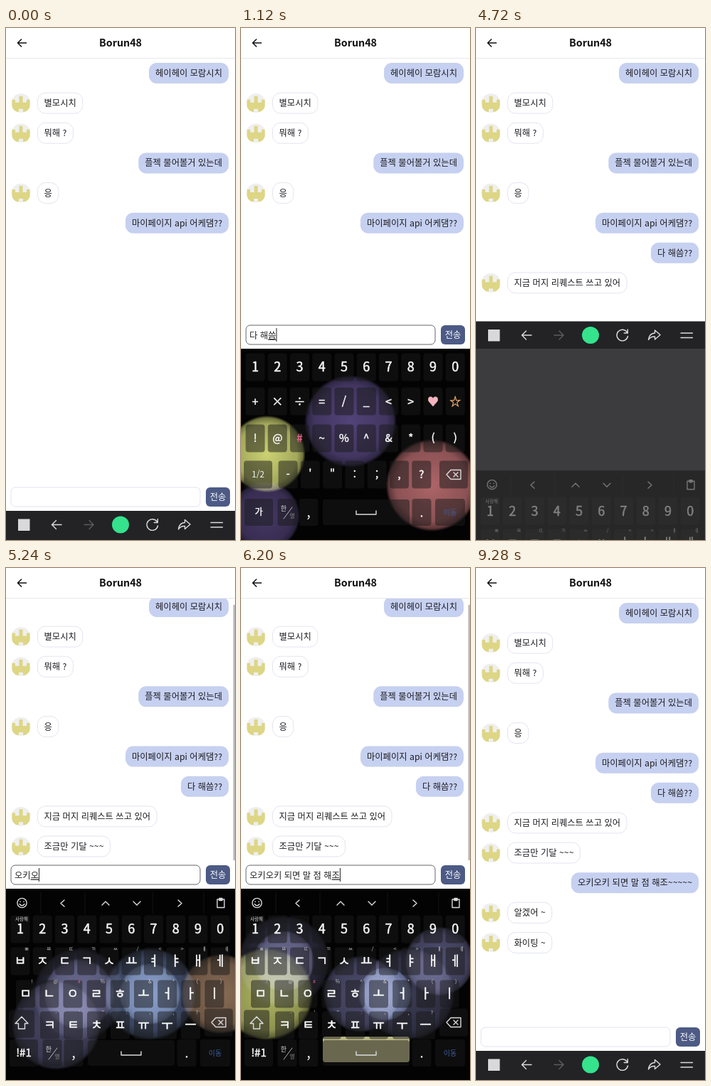
An HTML page that plays this animation: 322x720 px, repeating every 9.32 s.

```html
<!DOCTYPE html>
<html lang="ko">
<head>
<meta charset="utf-8">
<title>Chat</title>
<style>
  html, body { margin: 0; width: 100%; height: 100%; overflow: hidden; background: #fff; }
  svg { display: block; width: 100vw; height: 100vh; }
  text { font-family: "Noto Sans CJK KR", "Noto Sans CJK", "Noto Sans", sans-serif; white-space: pre; }
  .icon { fill: none; stroke: #dcdcde; stroke-width: 1.4; stroke-linecap: round; stroke-linejoin: round; }
  .key { fill: rgba(26, 26, 26, .5); }
  .glyph { paint-order: stroke; stroke: currentColor; stroke-width: .5; stroke-linejoin: round; font-weight: 500; }
  #glows { isolation: isolate; }
  #glows > * { mix-blend-mode: screen; }
</style>
</head>
<body>
<svg viewBox="0 0 322 720">
  <defs>
    <clipPath id="round"><circle cx="21" cy="0" r="13.6"/></clipPath>
    <clipPath id="board"><rect y="451" width="322" height="269"/></clipPath>
  </defs>
  <rect width="322" height="720" fill="#fff"/>
  <g id="chat"></g>
  <rect id="thumb" x="319.5" width="2.5" fill="#b9b9bb"/>
  <rect width="322" height="42" fill="#fff"/>
  <path d="M0 42.5H322" stroke="#e9e9ec"/>
  <path d="M29 21H16.5M22 15.500L16.500 21L22 26.500" fill="none" stroke="#111" stroke-width="1.5"/>
  <g id="composer">
    <rect y="639" width="322" height="40" fill="#fff"/>
    <rect id="field" x="7" y="646" width="266" height="27" rx="6" fill="#fff"/>
    <text id="entry" x="12" y="664.5" font-size="12.300" fill="#222"><tspan id="done"></tspan><tspan id="composing" text-decoration="underline"></tspan></text>
    <rect id="caret" y="650" width="1" height="19" fill="#222"/>
    <rect x="281" y="646" width="34" height="27" rx="6" fill="#4c5a85"/>
  </g>
  <g id="nav">
    <rect y="679" width="322" height="41" fill="#232326"/>
    <rect x="17" y="690.500" width="16.500" height="16.500" fill="#d9d9dc"/>
    <g class="icon">
      <path d="M78 698.500H64.500M70.500 692.500L64.500 698.500L70.500 704.500"/>
      <path d="M110 698.500H123M117 692.500L123 698.500L117 704.500" stroke="#5c5c60"/>
      <path d="M212.500 694.500A7.800 7.800 0 1 0 213.500 700M213.300 690.500V695.500H208.300"/>
      <path d="M251.500 691.500L259 698L251.500 704.500V700.500Q245.500 700 242.500 705Q243.500 696 251.500 695.500Z"/>
      <path d="M288 695.500H304.500M288 702H304.500"/>
    </g>
    <circle cx="161" cy="698.500" r="12" fill="#34e38c"/>
  </g>
  <rect id="backdrop" y="451" width="322" height="269" fill="#3c3c3e"/>
  <g id="keyboard">
    <rect y="451" width="322" height="269" fill="#030303"/>
    <g id="glows" clip-path="url(#board)"></g>
    <g id="letters">
      <path d="M49 456V486M111 456V486M206 456V486M278 456V486" stroke="#151515"/>
      <g class="icon">
        <circle cx="22.500" cy="471" r="6.600"/>
        <path d="M20 469V469.500M25 469V469.500M19 472.500Q22.500 477 26 472.500"/>
        <path d="M82 467L77 471.500L82 476M135 474L140 469L145 474M179 469L184 474L189 469M242 467L247 471.500L242 476"/>
        <path d="M297 466H307V477.500H297ZM300 464.500H304V467.500H300Z"/>
      </g>
    </g>
    <g id="symbols"></g>
  </g>
</svg>
<script>
const LOOP = 9320, RISE = 220, FALL = 200, LIFT = 228;
const $ = id => document.getElementById(id);

function add(parent, tag, attrs = {}, content) {
  const node = document.createElementNS('http://www.w3.org/2000/svg', tag);
  for (const name in attrs) node.setAttribute(name, attrs[name]);
  if (content) node.textContent = content;
  return parent.appendChild(node);
}

const label = (parent, x, y, size, content, fill = '#f4f4f4', extra = {}) =>
  add(parent, 'text', { x, y: y + size * .36, 'font-size': size, 'text-anchor': 'middle', fill, ...extra }, content);

label($('composer'), 298, 659.5, 12.3, '전송', '#fff');
const title = label(document.querySelector('svg'), 161, 21, 14.3, 'Borun48', '#111', { 'font-weight': 700 });
$('composer').before(title);

// Chat messages: arrival time, text, sent by the user
const messages = [
  [0, '헤이헤이 모람시치', true], [0, '별모시치'], [0, '뭐해 ?'],
  [0, '플젝 물어볼거 있는데', true], [0, '응'], [0, '마이페이지 api 어케댐??', true],
  [1760, '다 해씀??', true], [3080, '지금 머지 리퀘스트 쓰고 있어'],
  [5200, '조금만 기달 ~~~'], [6600, '오키오키 되면 말 점 해조~~~~~', true],
  [8120, '알겠어 ~'], [9040, '화이팅 ~']
].map(([at, words, mine], i) => {
  const row = add($('chat'), 'g', { transform: `translate(0 ${63.5 + 42.13 * i})` });
  const text = add(row, 'text', { y: 4.6, 'font-size': 12.3, fill: '#1d1d22' }, words);
  const width = text.getComputedTextLength() + 18;
  const x = mine ? 313 - width : 44.5;
  text.setAttribute('x', x + 9);
  text.before(add(row, 'rect', {
    x, y: -14.5, width, height: 29, rx: 11,
    fill: mine ? '#c6d0f0' : '#fff', stroke: mine ? 'none' : '#e3e5ee'
  }));
  if (!mine) {
    const face = add(row, 'g', { 'clip-path': 'url(#round)' });
    add(face, 'circle', { cx: 21, r: 13.6, fill: '#efefef' });
    add(face, 'path', { d: 'M8.500 -5H13V-1H18.500V-10H23.500V-1H29V-5H33.500V12H24V8H18V12H8.500Z', fill: '#ddd685' });
  }
  return { at, row };
});

// Keyboard
const keyAt = {};
const pink = { '#': '#e0638a', '♥': '#f3b6c0', '☆': '#eaa86a' };
const keyBox = (parent, x, y, w, h) =>
  add(parent, 'rect', { class: 'key', x: x - w / 2, y: y - h / 2, width: w, height: h, rx: 4 });

function keyRow(parent, y, x0, step, chars, hints = '', size = 18) {
  [...chars].forEach((char, i) => {
    const x = x0 + step * i, fill = pink[char] || '#fafafa';
    keyBox(parent, x, y, 27, 39);
    label(parent, x, y, size, char, fill, { class: 'glyph', color: fill });
    if (hints[i]) label(parent, x + 9, y - 18, 7, hints[i], pink[hints[i]] || '#cfcfcf');
    keyAt[char] = [x, y];
  });
}

function edgeKeys(parent, y, left, backspaceY) {
  keyBox(parent, 25, y, 40, 38);
  label(parent, 25, y, left.length > 1 ? 15 : 12, left, '#fafafa', { class: 'glyph', color: '#fafafa' });
  keyBox(parent, 65, y, 27, 38);
  label(parent, 60, y - 5, 9, '한', '#ddd');
  label(parent, 72, y + 5, 8, '영', '#888');
  add(parent, 'path', { class: 'icon', d: `M60 ${y + 9}L72 ${y - 7}`, style: 'stroke-width:.8' });
  keyBox(parent, 95, y, 27, 38);
  label(parent, 95, y, 20, ',');
  keyBox(parent, 176, y, 122, 36);
  add(parent, 'path', { class: 'icon', d: `M162 ${y - 2}V${y + 3}H190V${y - 2}` });
  keyBox(parent, 254, y, 27, 38);
  label(parent, 254, y, 20, '.');
  keyBox(parent, 294, y, 42, 38);
  label(parent, 294, y, 10, '이동', '#3f5f9e');
  keyBox(parent, 299, backspaceY, 40, 39);
  add(parent, 'path', {
    class: 'icon',
    d: `M289 ${backspaceY}L295 ${backspaceY - 6.5}H309V${backspaceY + 6.5}H295ZM299 ${backspaceY - 3}l6 6m0 -6l-6 6`
  });
}

const letters = $('letters'), symbols = $('symbols');
keyRow(letters, 508, 20, 31.25, '1234567890');
label(letters, 22, 494, 6.5, '사랑해', '#ddd');
keyRow(letters, 553, 20, 31.25, 'ㅂㅈㄷㄱㅅㅛㅕㅑㅐㅔ', 'ㅃㅉㄸㄲㅆ/<>ㅒㅖ');
keyRow(letters, 599, 27.5, 33.2, 'ㅁㄴㅇㄹㅎㅗㅓㅏㅣ', '!@#%^&*()');
keyBox(letters, 22, 641, 36, 39);
add(letters, 'path', { class: 'icon', d: 'M22 631L31 640.500H26.500V648H17.500V640.500H13Z' });
keyRow(letters, 643, 61.5, 33, 'ㅋㅌㅊㅍㅠㅜㅡ', '-\'":;,?');
edgeKeys(letters, 682, '!#1', 639);
keyRow(symbols, 477, 20, 31.25, '1234567890');
keyRow(symbols, 525, 20, 31.25, '+×÷=/_<>♥☆', '', 16);
keyRow(symbols, 577, 20, 31.25, '!@#~%^&*()', '', 15);
keyBox(symbols, 24, 628, 40, 39);
label(symbols, 24, 628, 12, '1/2');
keyRow(symbols, 628, 66, 31.3, '-\'":;,?', '', 15);
edgeKeys(symbols, 681, '가', 628);
keyAt['ㅆ'] = keyAt['ㅅ'];
keyAt.mode = [25, 686];

// Key presses light up the board in a colour of their own
const tints = {
  'ㅁ': '#dfe67c', 'ㅆ': '#a283ee', 'ㄴ': '#9d7cc4', 'ㅡ': '#dc8084', 'ㅕ': '#a9bcd0',
  'ㅣ': '#98785f', 'ㅗ': '#6579a8', mode: '#4a3c6c'
};
const glows = [], entries = [[0, '', '']];

function glowFill(key) {
  const id = `glow${key.codePointAt(0)}`;
  if (!$(id)) {
    const fill = add(document.querySelector('defs'), 'radialGradient', { id });
    for (const [offset, alpha] of [[0, 1], [.78, .8], [.93, .55], [1, 0]])
      add(fill, 'stop', { offset, 'stop-color': tints[key] || '#55557a', 'stop-opacity': alpha });
  }
  return `url(#${id})`;
}

function press(at, key) {
  const [x, cy] = keyAt[key] || [176, 677];
  const space = key === ' ';
  const node = space
    ? add($('glows'), 'rect', { x: 115, y: 659, width: 122, height: 36, rx: 4, fill: '#c0be82' })
    : add($('glows'), 'circle', { cx: x + 9, cy, fill: glowFill(key) });
  glows.push({ at, node, space });
}

// Each group is one character, spelled as its successive composing stages
function type(start, step, before, groups, keys) {
  let at = start, done = before;
  for (const group of groups.split('|')) {
    for (const stage of group) {
      entries.push(/[ ?~]/.test(stage) ? [at, done + stage, ''] : [at, done, stage]);
      at += step;
    }
    done += group.at(-1);
  }
  [...keys].forEach((key, i) => press(start + i * step, key));
}

type(440, 80, '', 'ㄷ다| |ㅎ해|ㅆ쓰씀', 'ㄷㅏ ㅎㅐㅆㅡㅁ');
press(1040, 'mode');
type(1280, 160, '다 해씀', '?|?', '??');
entries.push([1720, '', '']);
type(4960, 48, '', 'ㅇ오|ㅋ키|ㅇ오|ㅋ키| |ㄷ도되|ㅁ며면| ', 'ㅇㅗㅋㅣㅇㅗㅋㅣ ㄷㅗㅣㅁㅕㄴ ');
type(5760, 40, '오키오키 되면 ', 'ㅁ마말| |ㅈ저점| |ㅎ해|ㅈ조', 'ㅁㅏㄹ ㅈㅓㅁ ㅎㅐㅈㅗ');
press(6250, 'mode');
type(6320, 40, '오키오키 되면 말 점 해조', '~|~|~|~|~', '~~~~~');
entries.push([6560, '', '']);

const sessions = [[120, 3800], [4640, 6640]];
const symbolSpans = [[1040, 1720], [6250, 6840]];
const show = (node, on) => node.setAttribute('visibility', on ? 'visible' : 'hidden');
const within = (t, [from, to]) => t >= from && t < to;

function render(t) {
  const session = sessions.find(([from, to]) => within(t, [from, to + FALL]));
  const rise = session
    ? Math.min(1, (t - session[0]) / RISE, 1 - Math.max(0, t - session[1]) / FALL) : 0;
  const open = rise === 1;

  // Page
  let count = 0;
  for (const { at, row } of messages) {
    show(row, t >= at);
    if (t >= at) count++;
  }
  const view = 368, content = 40 + 42.13 * (count - 1);
  const scroll = open ? Math.max(0, content - view) : 0;
  $('chat').setAttribute('transform', `translate(0 ${-scroll})`);
  show($('thumb'), scroll > 0);
  $('thumb').setAttribute('y', 43 + scroll * view / content);
  $('thumb').setAttribute('height', view * view / content);

  // Text field
  const [since, done, composing] = entries.findLast(entry => entry[0] <= t);
  $('composer').setAttribute('transform', `translate(0 ${open ? -LIFT : 0})`);
  $('field').setAttribute('stroke', done || composing ? '#66666c' : '#e1e3ec');
  $('done').textContent = done;
  $('composing').textContent = composing;
  $('caret').setAttribute('x', 12 + (done || composing ? $('entry').getComputedTextLength() : 0));
  show($('caret'), open && (t - since) % 1000 < 500);

  // Browser bar and keyboard
  show($('nav'), !open);
  show($('backdrop'), session);
  $('nav').setAttribute('transform', `translate(0 ${session ? -266.5 : 0})`);
  $('keyboard').setAttribute('transform', `translate(0 ${269 * (1 - rise)})`);
  $('keyboard').setAttribute('opacity', rise);
  const symbolic = symbolSpans.some(span => within(t, span));
  letters.setAttribute('display', symbolic ? 'none' : 'inline');
  symbols.setAttribute('display', symbolic ? 'inline' : 'none');
  for (const { at, node, space } of glows) {
    const age = t - at, life = 360;
    const lit = within(age, [0, life]);
    node.setAttribute('opacity', lit ? .95 * (1 - (age / life) ** 3) : 0);
    if (lit && !space) node.setAttribute('r', 38 + 27 * Math.min(1, age / 200));
  }
}

const start = performance.now();
function tick() {
  const t = (performance.now() - start) % LOOP;
  render(Math.floor(t / 40) * 40);
  requestAnimationFrame(tick);
}
tick();
</script>
</body>
</html>
```
